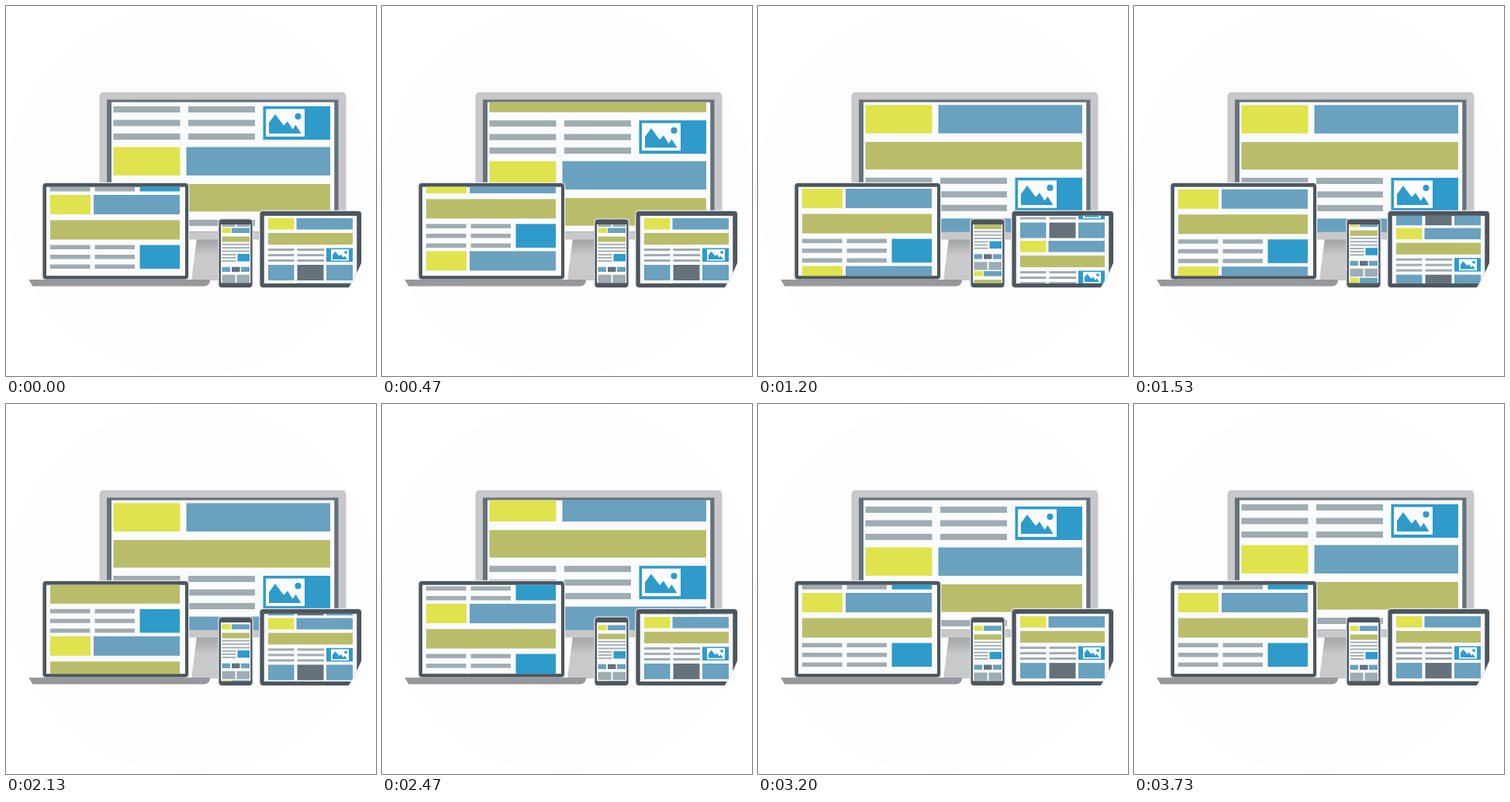
Recreate the animation shown at these times as an HTML page with a canvas. Size 477 by 476 pixels, loop 4070 ms.

```html
<!DOCTYPE html>
<html lang="en">
<head>
<meta charset="utf-8">
<title>Responsive devices</title>
<style>
html, body { margin: 0; width: 100%; height: 100%; overflow: hidden; background: #fff; }
canvas { display: block; }
</style>
</head>
<body>
<canvas id="stage" width="477" height="476"></canvas>
<script>
const ctx = document.getElementById('stage').getContext('2d');
const LOOP = 4070, STEP = 1000 / 15;

const YELLOW = '#dfe34e', BLUE = '#69a1bf', BRIGHT = '#2e9bcb', OLIVE = '#b9bd6a';
const GREY = '#9facb2', SLATE = '#65717b', FRAME = '#4d565e', PAPER = '#fafbfd';

// Easing: symmetric glide, sudden flick that dies away, softer critically damped settle.
function glide(t, start, end) {
  const u = Math.min(1, Math.max(0, (t - start) / (end - start)));
  return u * u * (3 - 2 * u);
}
const flick = (t, start, tau) => t < start ? 0 : 1 - Math.exp((start - t) / tau);
function settle(t, start, rate) {
  const u = Math.max(0, t - start) * rate;
  return 1 - (1 + u) * Math.exp(-u);
}

function box(color, left, top, right, bottom) {
  ctx.fillStyle = color;
  ctx.fillRect(left, top, right - left, bottom - top);
}

function panel(color, left, top, right, bottom, radius) {
  ctx.fillStyle = color;
  ctx.beginPath();
  ctx.roundRect(left, top, right - left, bottom - top, radius);
  ctx.fill();
}

function polygon(color, points) {
  ctx.fillStyle = color;
  ctx.beginPath();
  points.forEach(([x, y]) => ctx.lineTo(x, y));
  ctx.fill();
}

function lines(spans, tops, height) {
  for (const y of tops)
    for (const [left, right] of spans) box(GREY, left, y, right, y + height);
}

// Picture placeholder: white card with a mountain range and a sun.
function picture(left, top, width, height) {
  box(PAPER, left, top, left + width, top + height);
  const at = (x, y) => [left + x * width, top + y * height];
  polygon(BRIGHT, [at(.08, .89), at(.08, .5), at(.24, .19), at(.46, .6), at(.56, .45),
    at(.69, .74), at(.77, .58), at(.91, .89)]);
  ctx.beginPath();
  ctx.arc(...at(.83, .27), width * .082, 0, 7);
  ctx.fill();
}

function monitorPage() {
  lines([[138.5, 224.5], [235, 321]], [129, 146.5, 164], 8);
  box(BRIGHT, 331.5, 129, 418, 172);
  picture(335, 132.5, 50, 35.5);
  box(YELLOW, 138.5, 181.5, 224.5, 218);
  box(BLUE, 232.5, 181.5, 418, 218);
  box(OLIVE, 138.5, 229, 418, 264.5);
}

function laptopPage() {
  box(YELLOW, 57, 243, 109, 268);
  box(BLUE, 113, 243, 224, 268);
  box(OLIVE, 57, 275.5, 224, 300.5);
  lines([[57, 108.5], [114.5, 166]], [307.5, 320, 332.5], 5.5);
  box(BRIGHT, 172.5, 307.5, 224, 338);
}

function tabletPage() {
  box(YELLOW, 338, 273, 371.5, 287.5);
  box(BLUE, 374.5, 273, 447, 287.5);
  box(OLIVE, 338, 292, 447, 307);
  lines([[338, 371.5], [375.5, 410]], [312, 319, 326], 3);
  box(BRIGHT, 413, 311.5, 447, 329);
  picture(419, 313, 23, 14.5);
  box(BLUE, 338, 333, 371.5, 353);
  box(SLATE, 375.5, 333, 409.5, 353);
  box(BLUE, 413, 333, 447, 353);
}

function phonePage() {
  box(YELLOW, 278.5, 285.5, 290, 292);
  box(BLUE, 291, 285.5, 314, 292);
  box(OLIVE, 278.5, 296.5, 314, 303.5);
  lines([[278.5, 314]], [305.8, 310.2, 314.6], 1.8);
  lines([[278.5, 296.5]], [319, 323, 327.2], 1.8);
  box(BRIGHT, 298.5, 319, 314, 328.5);
  box(BLUE, 278.5, 335.7, 289, 342);
  box(SLATE, 291, 335.7, 301.5, 342);
  box(BLUE, 303, 335.7, 314, 342);
  box(GREY, 278.5, 345.7, 295.5, 356);
  box(GREY, 297.5, 345.7, 314, 356);
}

// Shows a scrolled strip of page copies, numbered first to last, through a screen opening.
function screen(left, top, right, bottom, page, period, offset, first, last) {
  ctx.save();
  ctx.beginPath();
  ctx.rect(left, top, right - left, bottom - top);
  ctx.clip();
  box(PAPER, left, top, right, bottom);
  ctx.translate(0, offset + first * period);
  for (let i = first; i <= last; i++) {
    page();
    ctx.translate(0, period);
  }
  ctx.restore();
}

function casing(left, top, right, bottom, radius) {
  panel('#e3e6e6', left - 1.3, top - 1.3, right + 1.3, bottom + 1, radius + 1);
  panel(FRAME, left, top, right, bottom, radius);
}

function monitor(t) {
  const shade = ctx.createLinearGradient(0, 300, 0, 322);
  shade.addColorStop(0, '#a2a3a6');
  shade.addColorStop(1, '#c9c9cb');
  polygon(shade, [[246, 299], [312, 299], [318, 353], [239, 353]]);
  panel('#c8c8ca', 120.5, 111, 438.5, 300.5, 5);
  box(SLATE, 130, 120.5, 428.5, 290.5);
  const offset = 92 * (glide(t, 165, 1225) - glide(t, 2205, 3320));
  screen(136, 123.5, 423.5, 290.5, monitorPage, 146, offset, -1, 1);
}

function laptop(t) {
  casing(47.5, 228, 235, 351.5, 4);
  const offset = 92.5 * (flick(t, 100, 240) - glide(t, 1690, 2720));
  screen(52, 232.5, 231, 347.3, laptopPage, 99.5, offset, -1, 0);
  panel('#97989b', 20, 352, 263, 360.5, [0, 1, 8, 0]);
}

function phone(t) {
  casing(274.5, 274.5, 317.5, 362, 4);
  screen(277, 281, 315.5, 356.5, phonePage, 72, 72 * flick(t, 535, 450), -1, 1);
}

function tablet(t) {
  casing(327.5, 264, 458, 362, 4);
  screen(332.5, 269.7, 452.5, 357, tabletPage, 83.5, -83.5 * settle(t, 545, .0034), 0, 2);
}

function draw(t) {
  box('#fff', 0, 0, 477, 476);
  ctx.save();
  ctx.beginPath();
  ctx.arc(238.5, 237.5, 238.5, 0, 7);
  ctx.clip();
  box('#fdfdfd', 0, 0, 477, 476);
  monitor(t);
  laptop(t);
  phone(t);
  tablet(t);
  ctx.restore();
}

const began = performance.now();
function tick() {
  const t = (performance.now() - began) % LOOP;
  // The small lead absorbs the rounding of frame times to 10 ms.
  draw(Math.floor(t / STEP + .06) * STEP);
  requestAnimationFrame(tick);
}
tick();
</script>
</body>
</html>
```
